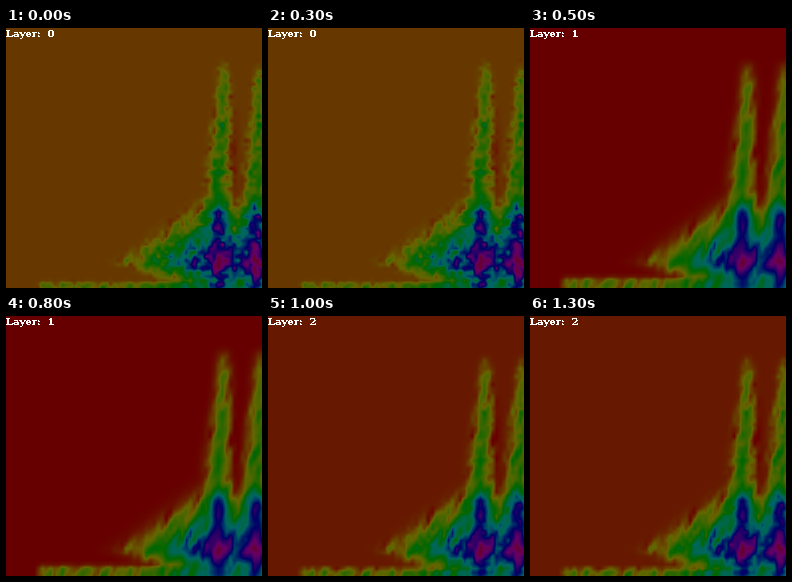
A matplotlib script that plays this animation: 256 px wide and 260 px high, repeating every 1.5 s.

```python
import numpy as np
import matplotlib.pyplot as plt
from matplotlib.animation import FuncAnimation
from matplotlib.colors import hsv_to_rgb

W, H, DPI = 256, 260, 100
CELL = 4
PX = 72 / DPI
CORE_X, CORE_Y, SPACING = 212, 234, 37

# Hues in degrees: background, strength of grain and streaks; top of plumes and of the floor band
LAYERS = [
    dict(base=33, grain=0.8, streak=0.4, top=28, floor=254),
    dict(base=0, grain=0.1, streak=0.7, top=30, floor=250),
    dict(base=15, grain=0.35, streak=0.75, top=36, floor=252),
]

X, Y = np.meshgrid(np.arange(0, W + CELL, CELL), np.arange(0, H + CELL, CELL))


def ramp(v, lo, hi):
    t = np.clip((v - lo) / (hi - lo), 0, 1)
    return t * t * (3 - 2 * t)


def bump(v, centre, width):
    return np.exp(-((v - centre) / width) ** 2)


def streaks(rng, waves=12):
    """Random plane waves whose crests lean steeply up to the right."""
    total = np.zeros(X.shape)
    for _ in range(waves):
        angle = rng.normal(0.55, 0.3)
        k = 2 * np.pi / rng.uniform(10, 20)
        phase = rng.uniform(0, 2 * np.pi)
        total += np.cos(k * (X * np.cos(angle) + Y * np.sin(angle)) + phase)
    return total / np.sqrt(waves / 2)


def plume(shift, top):
    """A tall column that swells in beats and brightens near its foot."""
    centre = CORE_X + shift + 5 * (1 - ramp(Y, 60, 170))
    rise = 1 - np.exp(-np.maximum(Y - top, 0) / 28)
    beat = 1 + 0.12 * np.cos(2 * np.pi * (Y - 100) / 45)
    height = (98 * rise + 132 * ramp(Y, 158, 192)) * beat
    width = 7 + 5 * ramp(Y, 40, 180)
    return height * bump(X, centre, width)


def cloud():
    """A soft diamond around the cores, repeated to the right."""
    left = CORE_X - X
    dx = np.where(left > 0, left, np.abs((X - CORE_X + SPACING / 2) % SPACING - SPACING / 2))
    dy = np.where(Y < CORE_Y, (CORE_Y - Y) / 78, (Y - CORE_Y) / 45)
    inside = 1 - dx / 105 - dy
    return 300 * np.log1p(np.exp(14 * inside)) / 14


def field(base, grain, streak, top, floor):
    rng = np.random.default_rng(5)
    columns = [plume(0, top), plume(SPACING, top)]
    ground = (68 * ramp(X, 28, 38) + 90 * ramp(X, 120, 200)) * ramp(Y, floor - 4, floor + 4)
    parts = columns + [cloud(), ground]
    level = sum(p ** 4 for p in parts) ** 0.25

    calm = 1 - 0.75 * ramp(sum(columns), 40, 200)
    noise = streak * streaks(rng) * calm + grain * rng.normal(size=X.shape)
    hue = np.hypot(base, level) + noise * (13 + 0.1 * level) * ramp(level, 1, 35)
    gap = 14 * bump(X, 228, 4) * ramp(Y, 60, 110) * (1 - ramp(Y, 160, 178))
    return np.clip(hue - gap, 0, 332)


def enlarge(grid):
    xs, ys = np.arange(W), np.arange(H)
    wide = np.array([np.interp(xs, X[0], row) for row in grid])
    return np.array([np.interp(ys, Y[:, 0], col) for col in wide.T]).T


def paint(layer):
    hue = enlarge(field(**layer)) / 360
    return hsv_to_rgb(np.dstack([hue, np.ones_like(hue), np.full_like(hue, 0.4)]))


pictures = [paint(layer) for layer in LAYERS]

fig = plt.figure(figsize=(W / DPI, H / DPI), dpi=DPI)
ax = fig.add_axes([0, 0, 1, 1])
ax.axis("off")
image = ax.imshow(pictures[0], extent=(0, W, H, 0), interpolation="nearest", aspect="auto")
label = ax.text(0, 9, "", color="white", family="DejaVu Serif", weight="bold",
                size=10 * PX, va="baseline", antialiased=False)


def update(i):
    image.set_data(pictures[i])
    label.set_text(f"Layer:  {i}")
    return image, label


anim = FuncAnimation(fig, update, frames=len(LAYERS), interval=500, repeat=True, repeat_delay=0)
plt.show()
```
